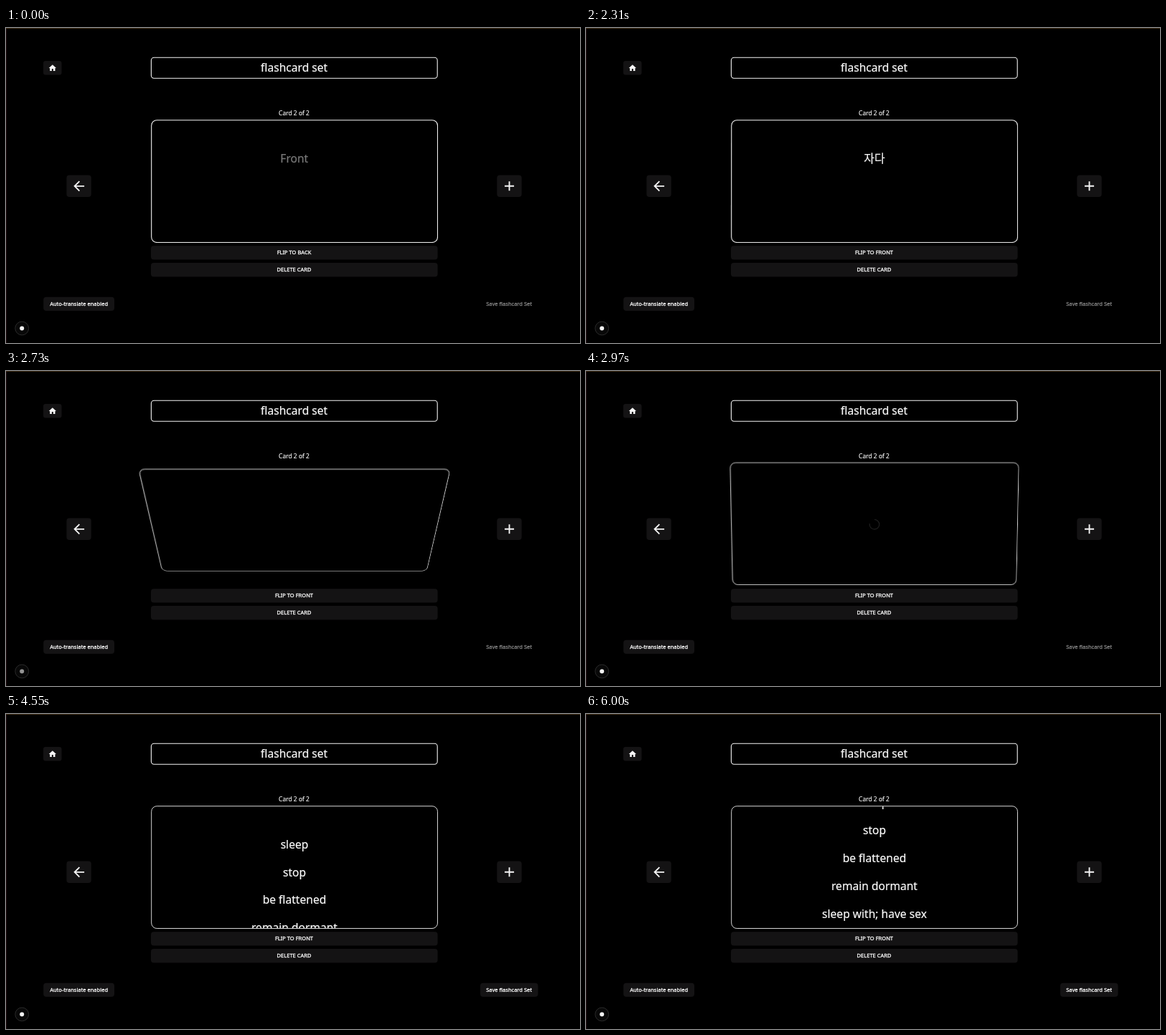
These frames come from a looping animation (800 px wide and 440 px high, 6.4 s). An HTML page:

```html
<!DOCTYPE html>
<html lang="en">
<head>
<meta charset="utf-8">
<title>Flashcards</title>
<style>
  html, body { margin: 0; width: 100%; height: 100%; overflow: hidden; background: #000; }
  svg { position: absolute; left: 0; top: 0; display: block; }
  text {
    font-family: "Noto Sans", "Open Sans", sans-serif; text-anchor: middle;
    color: #fafafa; fill: currentColor; stroke: currentColor; stroke-width: .15px;
  }
  .big { font-size: 15.6px; stroke-width: .2px; }
  .hangul { font: 16px "Noto Sans CJK KR", "Noto Sans CJK", sans-serif; }
  .count { font-size: 8.45px; }
  .label { font-size: 7.52px; stroke-width: .3px; }
  .button { fill: #141314; }
  .outline { fill: #000; stroke: #f2f2f2; stroke-width: 1.1; }
  .back .outline { stroke: #d4d4d4; stroke-width: 1; }
  .icon { fill: #f6f6f6; }
  .scene { position: absolute; left: 201.7px; top: 127.7px; width: 400px; height: 172px; perspective: 585px; }
  .card { position: absolute; inset: 0; transform-style: preserve-3d; }
  .face { backface-visibility: hidden; }
  .back { transform: rotateX(180deg); }
</style>
</head>
<body>
<svg width="800" height="440" viewBox="0 0 800 440">
  <rect width="800" height="1" fill="#3a2a14"/>
  <rect y="1" width="1" height="439" fill="#1e0c10"/>
  <rect class="outline" x="202.4" y="41.2" width="398.8" height="29" rx="4"/>
  <text class="big" x="401.7" y="61.2">flashcard set</text>
  <text class="count" x="401.5" y="121.8">Card 2 of 2</text>

  <rect class="button" x="52" y="46" width="25.5" height="19.4" rx="3"/>
  <path class="icon" transform="translate(58.6 49.7) scale(.52)" d="M10 20v-6h4v6h5v-8h3L12 3 2 12h3v8z"/>
  <rect class="button" x="84.4" y="205.6" width="34.4" height="30.4" rx="4"/>
  <path class="icon" transform="translate(90.6 209.7) scale(.925)" d="M20 11H7.83l5.59-5.59L12 4l-8 8 8 8 1.41-1.41L7.83 13H20z"/>
  <rect class="button" x="684.3" y="205.6" width="34.4" height="30.4" rx="4"/>
  <path class="icon" transform="translate(690.3 209.5) scale(.935)" d="M19 13h-6v6h-2v-6H5v-2h6V5h2v6h6z"/>

  <rect class="button" x="202" y="304.2" width="399.6" height="19.4" rx="4"/>
  <text class="label" id="flip" x="401.5" y="316.4"></text>
  <rect class="button" x="202" y="328" width="399.6" height="19.4" rx="4"/>
  <text class="label" x="401.5" y="340.2">DELETE CARD</text>
  <rect class="button" x="52.2" y="375.7" width="98.8" height="19.4" rx="4"/>
  <text class="label" x="101.6" y="387.8">Auto-translate enabled</text>
  <rect class="button" id="saveBox" x="661" y="375.7" width="80.5" height="19.4" rx="4"/>
  <text class="label" id="saveText" x="701.1" y="387.8">Save flashcard Set</text>

  <circle cx="22.2" cy="419.5" r="9.4" fill="#080808" stroke="#2b2b2b"/>
  <circle id="badge" cx="22.2" cy="419.5" r="3" fill="#f2f2f2"/>
</svg>

<div class="scene">
  <div class="card" id="card">
    <svg class="face" width="400" height="172" viewBox="201.7 127.7 400 172">
      <rect class="outline" x="202.4" y="128.4" width="398.8" height="170.8" rx="7.5"/>
      <text class="big" id="placeholder" x="401.5" y="187.4" style="color:#787878">Front</text>
      <text class="hangul" id="word" lang="ko" x="401.7" y="187.3"></text>
      <rect id="underline" y="189.5" width="14.7" height="1" fill="#f2f2f2"/>
      <rect id="caret" y="173" width=".8" height="17.5" fill="#f2f2f2"/>
    </svg>
    <svg class="face back" width="400" height="172" viewBox="201.7 127.7 400 172">
      <clipPath id="inside"><rect x="203" y="128.9" width="397.7" height="169.9" rx="7"/></clipPath>
      <rect class="outline" x="202.4" y="128.4" width="398.8" height="170.8" rx="7.5"/>
      <g clip-path="url(#inside)"><g id="list"></g></g>
      <circle id="spinner" cx="401.7" cy="214" r="6.8" fill="none" stroke="#d0d0d0" stroke-width="1.1" pathLength="100" stroke-dasharray="78 22"/>
    </svg>
  </div>
</div>

<script>
const LOOP = 6400, FLIP = 2297, FLIP_TIME = 820, ANSWER = 3640, GLYPH = 14.7, MIDDLE = 401.7;
const typing = [[0, ""], [610, "ㅈ"], [790, "자"], [1030, "자ㄷ"], [1130, "자다"]];
const meanings = ["sleep", "stop", "be flattened", "remain dormant", "sleep with; have sex"];

const el = {};
for (const node of document.querySelectorAll("[id]")) el[node.id] = node;

meanings.forEach((meaning, i) => {
  const line = document.createElementNS("http://www.w3.org/2000/svg", "text");
  line.setAttribute("class", "big");
  line.setAttribute("x", MIDDLE);
  line.setAttribute("y", 187.4 + i * 38.9);
  line.textContent = meaning;
  el.list.append(line);
});

const progress = (t, from, to) => Math.min(1, Math.max(0, (t - from) / (to - from)));
const smooth = x => x * x * (3 - 2 * x);
const show = (node, on) => node.style.opacity = +on;

// cubic-bezier(.4, 0, .2, 1)
function standardEase(x) {
  let low = 0, high = 1;
  for (let i = 0; i < 24; i++) {
    const u = (low + high) / 2, v = 1 - u;
    if (1.2 * v * v * u + .6 * v * u * u + u ** 3 < x) low = u; else high = u;
  }
  return smooth(low);
}

function drawWord(t) {
  const word = typing.filter(([at]) => at <= t).pop()[1];
  const right = MIDDLE + word.length * GLYPH / 2;
  const composing = word !== "" && t < 2310;
  el.word.textContent = word;
  show(el.placeholder, word === "");
  el.underline.setAttribute("x", right - GLYPH);
  el.caret.setAttribute("x", right);
  show(el.underline, composing);
  show(el.caret, composing && t < 1730);
}

function drawAnswer(t) {
  const saved = progress(t, ANSWER, ANSWER + 250);
  const tone = 130 + 120 * saved;
  show(el.saveBox, saved);
  el.saveText.style.color = `rgb(${tone},${tone},${tone})`;
  show(el.list, progress(t, ANSWER, 4160));
  const scroll = 58.6 * smooth(progress(t, 5555, 6000));
  el.list.setAttribute("transform", `translate(0 ${-scroll})`);
  show(el.spinner, t < ANSWER ? .7 * progress(t, 2860, 3360) : 0);
  el.spinner.setAttribute("transform", `rotate(${-90 + (t - 2970) * 360 / 1400} ${MIDDLE} 214)`);
}

function draw(t) {
  const turned = 180 * standardEase(progress(t, FLIP, FLIP + FLIP_TIME));
  el.card.style.transform = `rotateX(${turned}deg)`;
  el.flip.textContent = t < 2310 ? "FLIP TO BACK" : "FLIP TO FRONT";
  const busy = t > 2310 && t < 3610;
  show(el.badge, busy ? .75 + .25 * Math.cos((t - 2310) * Math.PI / 325) : 1);
  drawWord(t);
  drawAnswer(t);
}

const start = performance.now();
function tick() {
  draw((performance.now() - start) % LOOP);
  requestAnimationFrame(tick);
}
tick();
</script>
</body>
</html>
```
